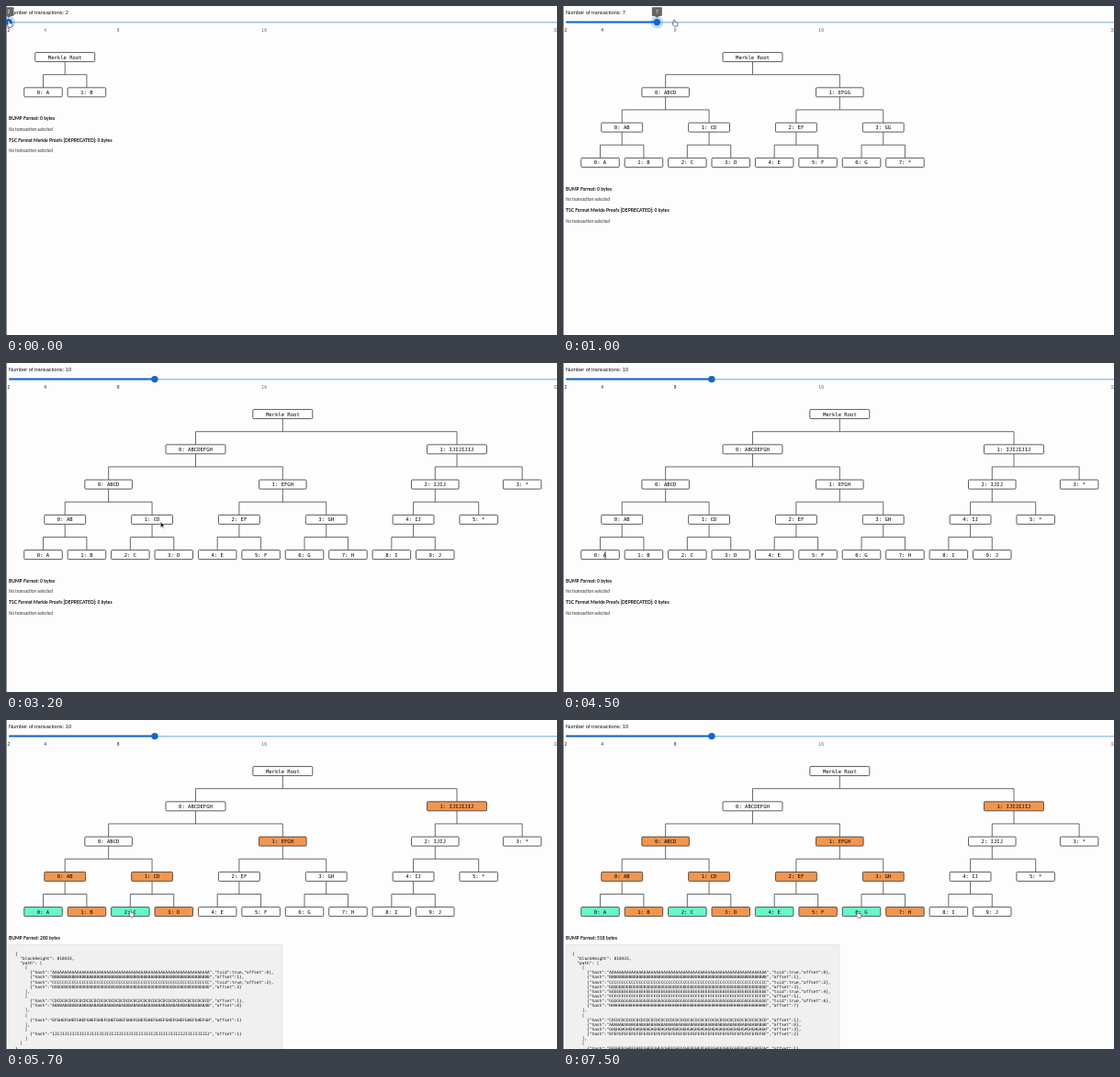
Write an HTML page with a canvas that moves like this. It is 600 px wide and 358 px high and loops after 7600 ms.

```html
<!DOCTYPE html>
<html lang="en">
<head>
<meta charset="utf-8">
<title>Merkle tree</title>
<style>
html, body { margin: 0; width: 100%; height: 100%; overflow: hidden; background: #fdfdfd; }
canvas { display: block; width: 600px; height: 358px; }
</style>
</head>
<body>
<canvas id="stage" width="600" height="358"></canvas>
<script>
const ctx = document.getElementById('stage').getContext('2d');
const LOOP = 7600, STEP = 100;
const SANS = '"Liberation Sans", Arial, sans-serif';
const LATO = 'Lato, sans-serif';
const MONO = '"DejaVu Sans Mono", monospace';
const BLUE = '#1565c8', GREEN = '#66f9c5', ORANGE = '#f2964f';

// [time, value]: the value holds until the next time
const COUNTS = [[0, 2], [700, 3], [800, 4], [900, 5], [1000, 7], [1100, 8], [1200, 9], [1300, 10]];
const CLICKS = [[5000, 0], [5600, 2], [6300, 4], [7400, 6]];
// [time, x, y] of the pointer tip
const PATH = [
  [0, 3, 16], [600, 3, 16], [1000, 121, 15], [1400, 157, 17], [1600, 156, 16], [2500, 156, 16],
  [3300, 170, 195], [3700, 95, 265], [4100, 159, 320], [4400, 46, 209], [4800, 46, 209],
  [4900, 46, 207], [5100, 46, 207], [5500, 135.5, 207], [5700, 135.5, 207], [6200, 221, 209],
  [6500, 221, 209], [7300, 321, 208], [LOOP, 321, 208]
];
const HAND = new Path2D('M-.9 .6Q0 -.6 .9 .6V2.6L3.6 3.2Q4.2 3.5 4 5L3.2 7.2H.1L-2 4.4Q-1.8 3.4 -.9 4.2Z');
const ARROW = new Path2D('M0 0V6.5L1.6 5.1 2.7 7.4 3.6 7 2.6 4.8H4.6Z');
const BEAM = new Path2D('M-1.2 -3.4Q0 -3.4 0 -2.6V2.6Q0 3.4 -1.2 3.4M1.2 -3.4Q0 -3.4 0 -2.6M0 2.6Q0 3.4 1.2 3.4');

function text(str, x, y, size, family, { style = '', align = 'left', color = '#111' } = {}) {
  ctx.font = `${style} ${size}px ${family}`;
  ctx.textAlign = align;
  ctx.fillStyle = color;
  ctx.fillText(str, x, y + size * 0.36);
}

function box(x, y, w, h, r, fill, stroke) {
  ctx.beginPath();
  ctx.roundRect(x, y, w, h, r);
  ctx.fillStyle = fill;
  ctx.fill();
  if (stroke) { ctx.strokeStyle = stroke; ctx.lineWidth = 0.8; ctx.stroke(); }
}

function disc(x, y, r, fill) {
  ctx.beginPath();
  ctx.arc(x, y, r, 0, 7);
  ctx.fillStyle = fill;
  ctx.fill();
}

// Levels from the leaves to the root; span holds the first and last leaf column.
function buildTree(n) {
  let row = Array.from({ length: n }, (_, i) => ({ name: String.fromCharCode(65 + i), span: [i, i] }));
  const levels = [];
  while (row.length > 1) {
    if (row.length % 2) {
      const col = row.at(-1).span[1] + 1;
      row.push({ name: '*', span: [col, col] });
    }
    levels.push(row);
    const next = [];
    for (let i = 0; i < row.length; i += 2) {
      const [a, b] = [row[i], row[i + 1]];
      next.push({ name: a.name + (b.name === '*' ? a.name : b.name), span: [a.span[0], b.span[1]], kids: [a, b] });
    }
    row = next;
  }
  row[0].root = true;
  levels.push(row);
  return levels;
}

// Marks the chosen leaves and the siblings needed on their way up.
function buildProof(levels, chosen) {
  const proof = levels.slice(0, -1).map(() => []);
  for (const leaf of chosen) {
    proof.forEach((list, l) => {
      const i = leaf >> l, sibling = i ^ 1;
      if (!l) list.push({ i, txid: true });
      if (!list.some(e => e.i === sibling)) list.push({ i: sibling });
      levels[l][sibling].fill = ORANGE;
    });
  }
  for (const leaf of chosen) levels[0][leaf].fill = GREEN;
  return proof;
}

function proofLines(levels, proof) {
  const lines = ['{', '  "blockHeight": 818433,', '  "path": ['];
  proof.forEach((list, l) => {
    lines.push('    [');
    list.forEach(({ i, txid }, k) => {
      const hash = levels[l][i].name.repeat(64).slice(0, 64);
      lines.push(`      {"hash":"${hash}",${txid ? '"txid":true,' : ''}"offset":${i}}${k < list.length - 1 ? ',' : ''}`);
    });
    lines.push(l < proof.length - 1 ? '    ],' : '    ]');
  });
  return [...lines, '  ]', '}'];
}

function drawTree(levels) {
  const top = levels.length - 1;
  const cx = node => 40.5 + 47.42 * (node.span[0] + node.span[1]) / 2;
  levels.forEach((row, l) => {
    const y = 55.6 + 38.25 * (top - l);
    row.forEach((node, i) => {
      const x = cx(node), label = node.root ? 'Merkle Root' : `${i}: ${node.name}`;
      if (node.kids) {
        const [a, b] = node.kids.map(cx);
        ctx.beginPath();
        ctx.moveTo(x, y + 5);
        ctx.lineTo(x, y + 19.1);
        ctx.moveTo(a, y + 33.2);
        ctx.lineTo(a, y + 19.1);
        ctx.lineTo(b, y + 19.1);
        ctx.lineTo(b, y + 33.2);
        ctx.strokeStyle = '#444';
        ctx.lineWidth = 0.8;
        ctx.stroke();
      }
      const w = 28.1 + 3.35 * label.length;
      box(x - w / 2, y - 5, w, 10, 1, node.fill || '#fff', '#333');
      text(label, x, y, 5.57, MONO, { align: 'center', color: '#000' });
    });
  });
}

function drawSlider(n, active) {
  const pos = v => 3 + 19.867 * (v - 2), x = pos(n);
  text(`Number of transactions: ${n}`, 3, 6.6, 5.68, SANS);
  box(3, 16.9, 597, 1.5, 0, '#9cc3ea');
  box(3, 16.6, x - 3, 2, 1, BLUE);
  for (const v of [2, 4, 8, 16, 32])
    text(v, pos(v), 26.5, 5, SANS, { align: 'center', color: v <= n ? '#222' : '#666' });
  if (active) disc(x, 17.6, 7, `rgba(25,118,210,${0.25 * active})`);
  disc(x, 17.6, 3.7, BLUE);
  if (!active) return;
  ctx.globalAlpha = active;
  const w = n > 9 ? 14 : 11;
  box(x - w / 2, 1.2, w, 9.8, 1, '#666');
  ctx.beginPath();
  ctx.moveTo(x - 2, 11);
  ctx.lineTo(x + 2, 11);
  ctx.lineTo(x, 13);
  ctx.fill();
  text(n, x, 6.2, 5.2, SANS, { align: 'center', color: '#fff' });
  ctx.globalAlpha = 1;
}

function drawReport(levels, chosen, proof) {
  const y = 55.6 + 38.25 * (levels.length - 1) + 28.4;
  const bold = { style: 'bold' }, italic = { style: 'italic', color: '#333' };
  const hashes = proof.reduce((sum, list) => sum + list.length, 0);
  text(`BUMP Format: ${hashes ? 8 + 34 * hashes : 0} bytes`, 3, y, 4.96, LATO, bold);
  if (!chosen.length) {
    text('No transaction selected', 3, y + 11.7, 4.9, LATO, italic);
    text('TSC Format Merkle Proofs [DEPRECATED]: 0 bytes', 3, y + 23.5, 4.96, LATO, bold);
    text('No transaction selected', 3, y + 35.2, 4.9, LATO, italic);
    return;
  }
  const lines = proofLines(levels, proof);
  box(3, 244.6, 298, 14 + 5.15 * lines.length, 0.5, '#f0f0f0', '#e2e2e2');
  lines.forEach((line, i) => text(line, 10, 254 + 5.15 * i, 4.47, MONO));
}

function drawPointer(t) {
  const k = PATH.findIndex(p => p[0] > t), [t0, x0, y0] = PATH[k - 1], [t1, x1, y1] = PATH[k];
  const u = (t - t0) / (t1 - t0);
  const mix = (a, b) => a + (b - a) * u;
  ctx.save();
  ctx.translate(mix(x0, x1), mix(y0, y1));
  ctx.lineWidth = 0.6;
  if (t >= 4400 && t < 4900) {
    ctx.strokeStyle = '#222';
    ctx.stroke(BEAM);
  } else {
    const arrow = t >= 2600 && t < 4400;
    ctx.fillStyle = arrow ? '#000' : '#fff';
    ctx.strokeStyle = arrow ? '#fff' : '#222';
    const shape = arrow ? ARROW : HAND;
    ctx.fill(shape);
    ctx.stroke(shape);
  }
  ctx.restore();
}

function draw(now) {
  const t = Math.floor(now % LOOP / STEP) * STEP;
  const n = COUNTS.findLast(([at]) => at <= t)[1];
  const chosen = CLICKS.filter(([at]) => at <= t).map(([, leaf]) => leaf);
  const levels = buildTree(n), proof = buildProof(levels, chosen);
  box(0, 0, 600, 358, 0, '#fdfdfd');
  box(0, 0, 0.8, 358, 0, '#777');
  drawTree(levels);
  drawReport(levels, chosen, proof);
  drawSlider(n, Math.max(0, Math.min(1, (2800 - t) / 200)));
  drawPointer(t);
}

const start = performance.now();
function tick() {
  draw(performance.now() - start);
  requestAnimationFrame(tick);
}
tick();
</script>
</body>
</html>
```
